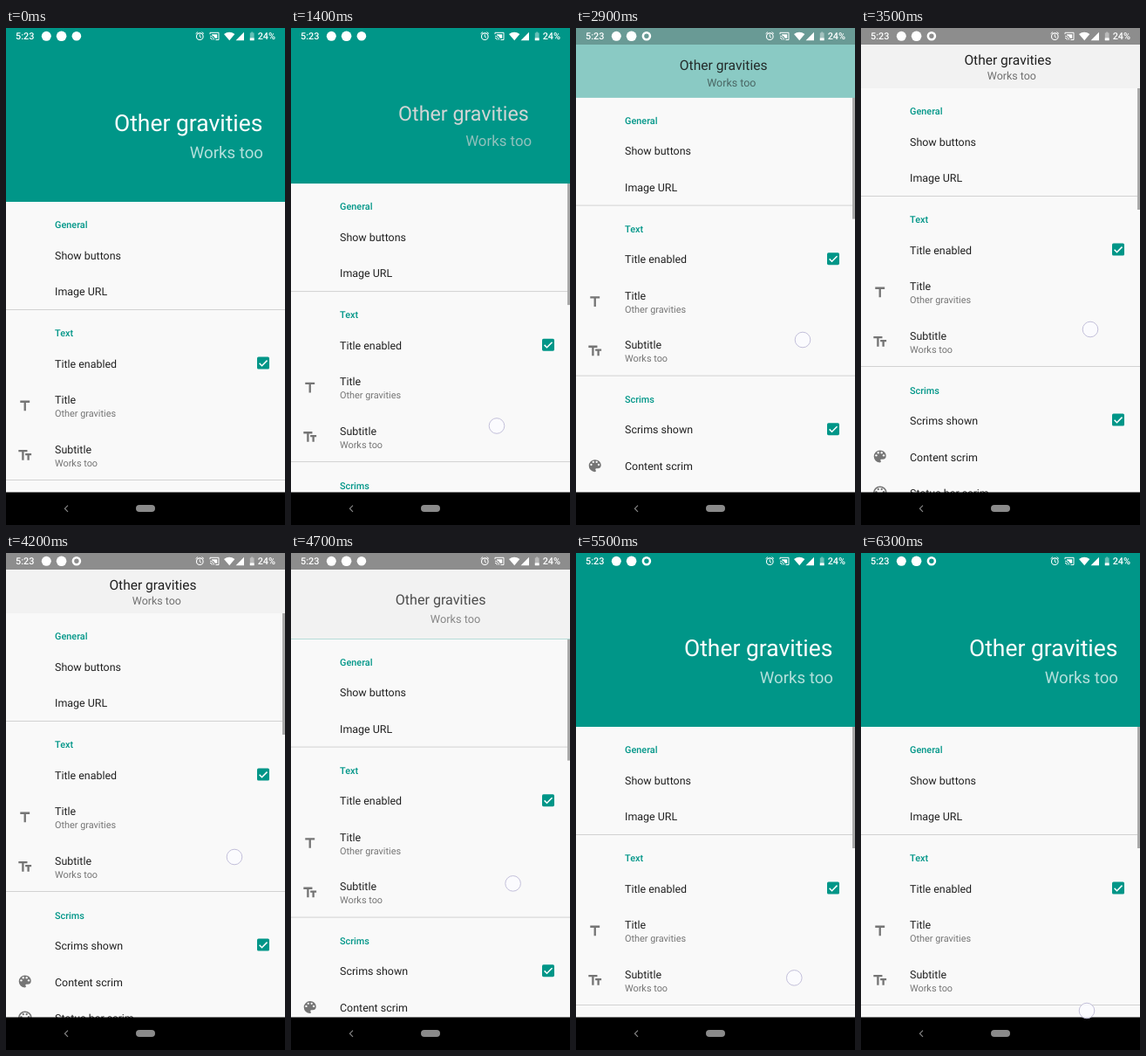
An HTML page that plays this animation: 320x569 px, repeating every 6.4 s.

```html
<!DOCTYPE html>
<html lang="en">
<head>
<meta charset="utf-8">
<title>Collapsing toolbar</title>
<style>
  html, body { margin: 0; width: 100%; height: 100%; overflow: hidden; background: #f9f9f9; }
  svg { display: block; width: 320px; height: 569px; }
  text { font-family: Roboto, "Noto Sans", sans-serif; text-rendering: geometricPrecision; white-space: pre; }
  .main { font-size: 12.45px; fill: #212121; }
  .sub { font-size: 10.89px; fill: #757575; }
  .head { font-size: 10.89px; font-weight: 500; fill: #009688; }
  .status { font-size: 10.89px; font-weight: 500; fill: #fff; }
  .icon { fill: #757575; }
</style>
</head>
<body>
<svg viewBox="0 0 320 569">
  <defs>
    <g id="check">
      <rect x="-7" y="-7" width="14" height="14" rx="1.6" fill="#009688"/>
      <path d="M-4.4 0.2L-1.5 3.1L4.5 -3" fill="none" stroke="#fff" stroke-width="1.5"/>
    </g>
    <path id="title" d="M5 4v3h5.5v12h3V7H19V4z"/>
    <path id="sizes" d="M2.5 4v3h5v12h3V7h5V4zM21.5 9h-9v3h3v7h3v-7h3z"/>
    <path id="blob" d="M12 3a9 9 0 0 0 0 18c.8 0 1.5-.7 1.5-1.5 0-.4-.15-.7-.4-1-.2-.3-.4-.6-.4-1 0-.8.7-1.5 1.5-1.5H16a5 5 0 0 0 5-5c0-4.4-4-8-9-8z"/>
    <g id="dots">
      <circle cx="6.5" cy="10.5" r="1.5"/><circle cx="9.5" cy="6.5" r="1.5"/>
      <circle cx="14.5" cy="6.5" r="1.5"/><circle cx="17.5" cy="10.5" r="1.5"/>
    </g>
    <g id="palette"><use href="#blob"/><use href="#dots" fill="#f9f9f9"/></g>
    <g id="outline"><use href="#blob" fill="none" stroke="#757575" stroke-width="2"/><use href="#dots"/></g>
  </defs>

  <rect width="320" height="569" fill="#f9f9f9"/>
  <g id="list"></g>
  <rect id="bar" x="317" width="3" height="139" fill="#a9a9a9"/>

  <rect class="header" width="320" fill="#009688"/>
  <rect class="header scrim" width="320" fill="#f2f2f2"/>
  <rect class="scrim" width="320" height="19" fill="rgba(0,0,0,.42)"/>
  <text id="big">Other gravities</text>
  <text id="small">Works too</text>

  <g fill="#fff">
    <text class="status" x="11" y="13.4">5:23</text>
    <circle cx="46.3" cy="9.3" r="5.5"/>
    <circle cx="63.6" cy="9.3" r="5.8"/>
    <circle id="dot" cx="80.9" cy="9.3" r="5.3"/>
    <circle id="ring" cx="80.9" cy="9.3" r="4" fill="none" stroke="#fff" stroke-width="2.6"/>
    <g fill="none" stroke="#fff">
      <circle cx="222.3" cy="9.7" r="3.8" stroke-width="1.1"/>
      <path d="M222.3 7.4V10l1.7 1M217.6 6.6l2.4-2M227 6.6l-2.4-2" stroke-width="1"/>
      <path d="M234 7.2V5.3h10v8.2h-3.6M234 9.2a4.4 4.4 0 0 1 4.4 4.4M234 11.3a2.3 2.3 0 0 1 2.3 2.3" stroke-width="1"/>
    </g>
    <path d="M236 7.2h6.2v4.6h-2.4a5.6 5.6 0 0 0-3.8-3.6zM250 6.9q6.2-4.4 12.4 0L256.2 14.2z"/>
    <path d="M273 4.8v9.4h-9.4z"/>
    <path d="M279.8 5.6h1.4V4.6h2v1h1.4v8.6h-4.8z" opacity=".4"/>
    <path d="M279.8 11.4h4.8v2.8h-4.8z"/>
    <text class="status" x="288.7" y="13.4">24%</text>
  </g>

  <rect y="531.5" width="320" height="37.5"/>
  <path d="M71 546.6l-3.6 3.6l3.6 3.6" fill="none" stroke="#8a8a8a" stroke-width="1.1"/>
  <rect x="149" y="546" width="22" height="8" rx="4" fill="#8a8a8a"/>
  <circle id="touch" r="8.8" fill="rgba(252,252,255,.85)" stroke="#c3c0da"/>
</svg>
<script>
const LOOP = 6400, STEP = 100, FULL = 199, RANGE = 130;
const $ = id => document.getElementById(id);
const all = sel => document.querySelectorAll(sel);
const lerp = (a, b, k) => a + (b - a) * k;
const clamp = (v, lo, hi) => Math.min(hi, Math.max(lo, v));

// Settings list
const text = (cls, y, s) => `<text class="${cls}" x="56" y="${y}">${s}</text>`;
const line = y => `<rect y="${y}" width="320" height="1" fill="#d2d2d2"/>`;
const check = y => `<use href="#check" x="295" y="${y}"/>`;
const icon = (id, y) => `<g class="icon" transform="translate(12.4 ${y - 9.3}) scale(.778)"><use href="#${id}"/></g>`;
$('list').innerHTML = [
  text('head', 229.3, 'General'),
  text('main', 264.6, 'Show buttons'),
  text('main', 306.4, 'Image URL'),
  line(322),
  text('head', 353.4, 'Text'),
  text('main', 388.6, 'Title enabled'), check(383.6),
  text('main', 430.4, 'Title'), text('sub', 445.3, 'Other gravities'), icon('title', 432.8),
  text('main', 486.9, 'Subtitle'), text('sub', 501.8, 'Works too'), icon('sizes', 489.2),
  line(517),
  text('head', 548.6, 'Scrims'),
  text('main', 583.9, 'Scrims shown'), check(578.6),
  text('main', 625.6, 'Content scrim'), icon('palette', 620.5),
  text('main', 667.4, 'Status bar scrim'), icon('outline', 662.3)
].join('');

// Finger path: time, x, y
const path = [
  [900, 229, 483], [1400, 236, 455.5], [2100, 248.5, 407], [2900, 260, 357],
  [3300, 263, 345], [3900, 263, 345], [4200, 262, 348], [4550, 257, 364],
  [4870, 252, 402], [5000, 250.5, 429], [5400, 250, 479], [5800, 253, 503], [6300, 259, 524]
];

// Monotone cubic through the path points
function along(t, c) {
  const n = path.length - 1;
  t = clamp(t, path[0][0], path[n][0]);
  const slope = i => (path[i + 1][c] - path[i][c]) / (path[i + 1][0] - path[i][0]);
  const tangent = i => {
    if (i === 0) return slope(0);
    if (i === n) return slope(n - 1);
    const a = slope(i - 1), b = slope(i);
    return a * b > 0 ? 2 * a * b / (a + b) : 0;
  };
  let i = 0;
  while (i < n - 1 && t > path[i + 1][0]) i++;
  const h = path[i + 1][0] - path[i][0], u = (t - path[i][0]) / h, v = 1 - u;
  return path[i][c] * (1 + 2 * u) * v * v + tangent(i) * h * u * v * v
    + path[i + 1][c] * u * u * (3 - 2 * u) - tangent(i + 1) * h * u * u * v;
}

// Cubic bezier easing with y handles 0/1 or 0/0.2-style x handles
function ease(k, x1, x2) {
  k = clamp(k, 0, 1);
  const at = (s, a, b) => 3 * a * s * (1 - s) ** 2 + 3 * b * s * s * (1 - s) + s ** 3;
  let lo = 0, hi = 1;
  for (let i = 0; i < 24; i++) {
    const mid = (lo + hi) / 2;
    at(mid, x1, x2) < k ? lo = mid : hi = mid;
  }
  return at(lo, 0, 1);
}

const scrimAt = t => t < 4870 ? ease((t - 2477) / 600, .4, 1) : 1 - ease((t - 4870) / 600, 0, .2);

function place(el, x, y, size, shade, alpha) {
  el.setAttribute('x', x);
  el.setAttribute('y', y);
  el.style.fontSize = size + 'px';
  el.style.fill = `rgba(${shade},${shade},${shade},${alpha})`;
}

function draw(t) {
  const down = t >= 900;
  const x = along(t, 1), y = along(t, 2);
  const off = down ? clamp((t < 3600 ? 476.4 : 478.8) - y, 0, RANGE) : 0;
  const k = off / RANGE, shrink = 1 - (1 - k) ** 2;
  const shade = Math.round(lerp(255, 0, k)), scrim = scrimAt(t);

  $('list').setAttribute('transform', `translate(0 ${-off})`);
  all('.header').forEach(el => el.setAttribute('height', FULL - off));
  all('.scrim').forEach(el => el.setAttribute('opacity', scrim));
  place($('big'), lerp(124, 118.4, k), lerp(118, 42, k), lerp(26.45, 15.56, shrink), shade, lerp(1, .87, k));
  place($('small'), lerp(210.8, 144.8, k), lerp(149, 59.2, k), lerp(18.67, 12.45, shrink), shade, lerp(.7, .54, k));

  $('bar').setAttribute('y', FULL - off);
  $('bar').setAttribute('visibility', t >= 1000 ? 'visible' : 'hidden');
  $('touch').setAttribute('transform', `translate(${x} ${y})`);
  $('touch').setAttribute('visibility', down ? 'visible' : 'hidden');

  const ring = (t >= 1500 && t < 4400) || t >= 5100;
  $('ring').setAttribute('visibility', ring ? 'visible' : 'hidden');
  $('dot').setAttribute('visibility', ring ? 'hidden' : 'visible');
}

const start = performance.now();
function tick() {
  const t = (performance.now() - start) % LOOP;
  draw(Math.floor(t / STEP) * STEP);
  requestAnimationFrame(tick);
}
draw(0);
requestAnimationFrame(tick);
</script>
</body>
</html>
```
